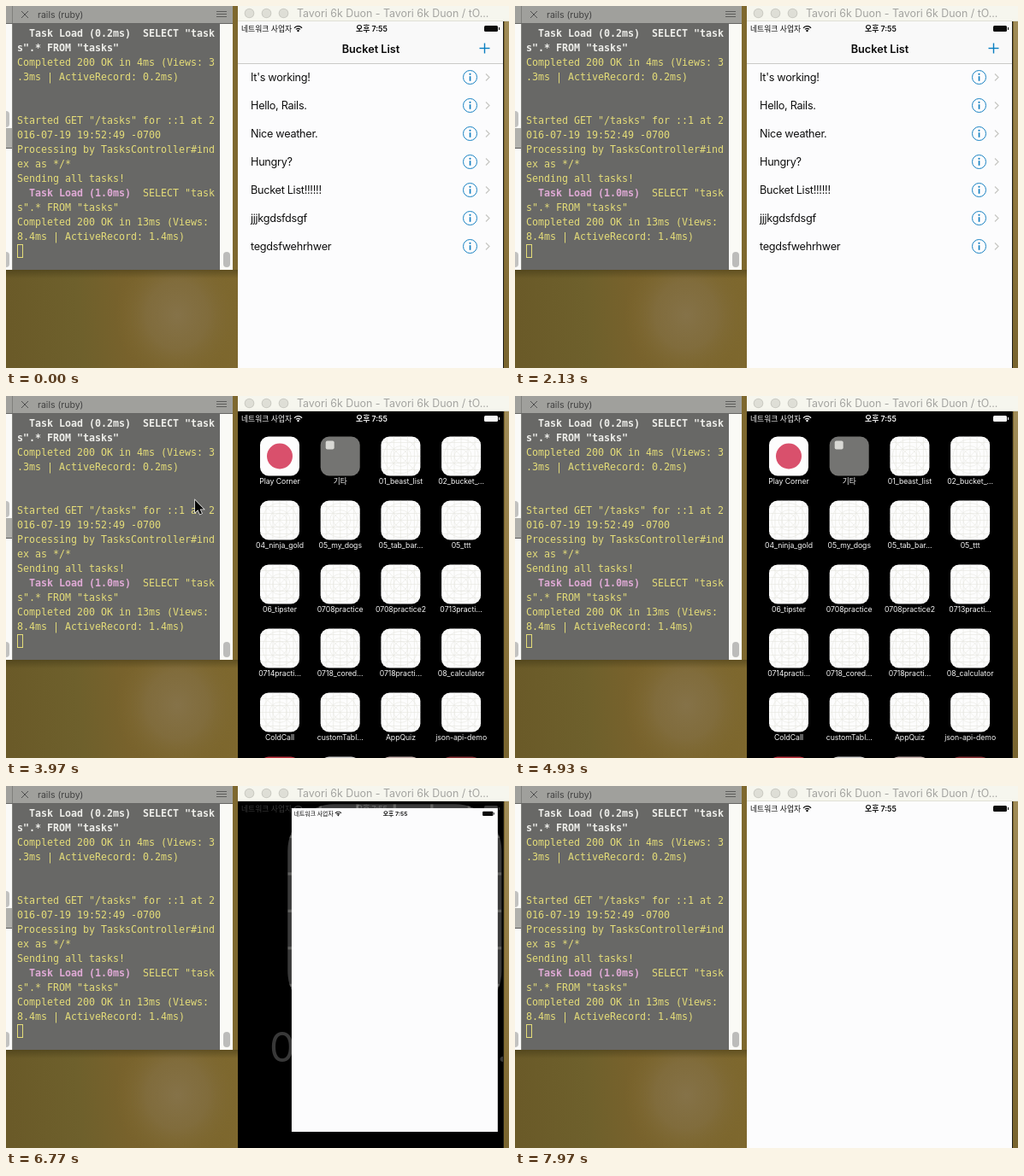
Animation of 588x424 px, one loop 8000 ms. Source, as an HTML page with a canvas:

```html
<!DOCTYPE html>
<html lang="ko">
<head>
<meta charset="utf-8">
<title>Tasks demo</title>
<style>
html, body { margin: 0; width: 100%; height: 100%; overflow: hidden; background: #70602c; }
canvas { display: block; }
</style>
</head>
<body>
<canvas id="stage" width="588" height="424"></canvas>
<script>
const ctx = document.getElementById('stage').getContext('2d');
const LOOP = 8000;
const SANS = 'Inter, "Noto Sans CJK KR", "Noto Sans CJK", sans-serif';
const MONO = '"DejaVu Sans Mono", monospace';
const SCREEN = { x: 271, y: 18, w: 311, h: 551 };
const ICON = 46;
const columnX = c => 320 + c * 70.7;
const rowY = r => 70.5 + r * 75;
const LAUNCH = { x: columnX(3), y: rowY(0) };

const tasks = ["It's working!", 'Hello, Rails.', 'Nice weather.', 'Hungry?',
  'Bucket List!!!!!!', 'jjjkgdsfdsgf', 'tegdsfwehrhwer'];
const apps = ['Play Corner', '기타', '01_beast_list', '02_bucket_…',
  '04_ninja_gold', '05_my_dogs', '05_tab_bar…', '05_ttt',
  '06_tipster', '0708practice', '0708practice2', '0713practi…',
  '0714practi…', '0718_cored…', '0718practi…', '08_calculator',
  'ColdCall', 'customTabl…', 'AppQuiz', 'json-api-demo'];
const LOG_COLOR = '#e4dc78';
const log = [
  [0, '  Task Load (0.2ms)  SELECT "task', '#eeeeea', 'bold'],
  [1, 's".* FROM "tasks"', '#eeeeea', 'bold'],
  [2, 'Completed 200 OK in 4ms (Views: 3'],
  [3, '.3ms | ActiveRecord: 0.2ms)'],
  [6, 'Started GET "/tasks" for ::1 at 2'],
  [7, '016-07-19 19:52:49 -0700'],
  [8, 'Processing by TasksController#ind'],
  [9, 'ex as */*'],
  [10, 'Sending all tasks!'],
  [11, '  Task Load (1.0ms)', '#e0aad6', 'bold'],
  [11, '                     SELECT "task'],
  [12, 's".* FROM "tasks"'],
  [13, 'Completed 200 OK in 13ms (Views:'],
  [14, '8.4ms | ActiveRecord: 1.4ms)']
];
// Pointer path: time, x, y; it is hidden between the two groups
const pointerPaths = [
  [[800, 232, 201], [980, 210, 221], [1250, 210, 221], [1500, 236, 206]],
  [[3450, 240, 151], [3700, 221, 122], [4230, 221, 122], [4500, 245, 151]]
];

const clamp = v => Math.max(0, Math.min(1, v));
const mix = (a, b, k) => a + (b - a) * k;
const easeOut = u => 1 - (1 - u) * (1 - u);

function rect(x, y, w, h, fill) {
  ctx.fillStyle = fill;
  ctx.fillRect(x, y, w, h);
}
function rounded(x, y, w, h, r, fill) {
  ctx.fillStyle = fill;
  ctx.beginPath();
  ctx.roundRect(x, y, w, h, r);
  ctx.fill();
}
function text(str, x, y, font, fill, align = 'left', spacing = 0) {
  ctx.font = font;
  ctx.fillStyle = fill;
  ctx.textAlign = align;
  ctx.letterSpacing = spacing + 'px';
  ctx.fillText(str, x, y);
  ctx.letterSpacing = '0px';
}
function disc(x, y, r, fill) {
  ctx.fillStyle = fill;
  ctx.beginPath();
  ctx.arc(x, y, r, 0, 7);
  ctx.fill();
}
function line(points, stroke, width = 1) {
  ctx.strokeStyle = stroke;
  ctx.lineWidth = width;
  ctx.beginPath();
  points.forEach(p => ctx.lineTo(p[0], p[1]));
  ctx.stroke();
}
function gradient(g, stops) {
  stops.forEach(([at, color]) => g.addColorStop(at, color));
  return g;
}

function wallpaper() {
  rect(0, 0, 588, 424, gradient(ctx.createLinearGradient(0, 330, 271, 309), [
    [0, '#6a5a28'], [.3, '#6e602c'], [.5, '#78622c'], [1, '#7e682e']]));
  ctx.save();
  ctx.translate(200, 362);
  ctx.scale(1, 1.1);
  disc(0, 0, 72, gradient(ctx.createRadialGradient(0, 0, 0, 0, 0, 72), [
    [0, '#857248'], [.5, 'rgba(130,110,64,.8)'], [1, 'rgba(126,104,46,0)']]));
  ctx.restore();
  rect(0, 309, 271, 10, gradient(ctx.createLinearGradient(0, 309, 0, 319), [
    [0, 'rgba(40,35,10,.35)'], [1, 'rgba(40,35,10,0)']]));
  rect(583, 18, 5, 406, gradient(ctx.createLinearGradient(0, 18, 0, 424), [
    [0, '#a08c58'], [.5, '#907840'], [1, '#78642e']]));
}

function terminal() {
  rect(0, 0, 265, 309, '#fafaf8');
  rect(0, 0, 265, 21, '#a0a09c');
  rect(7, 0, 1, 309, '#80807c');
  rect(0, 20, 265, 1, '#666664');
  line([[18, 6], [26, 14]], '#505050');
  line([[26, 6], [18, 14]], '#505050');
  text('rails (ruby)', 37, 14, '10.5px ' + SANS, '#404040');
  for (let y = 6; y < 15; y += 3) rect(246, y, 12, 1, '#5c5c5a');
  rect(0, 143, 7, 24, '#b0b0ac');
  rect(0, 166, 7, 1, '#5a5a58');
  rounded(-4, 123, 8, 19, 4, '#c2c2c0');
  rounded(-4, 288, 8, 18, 4, '#c2c2c0');
  rect(8, 21, 242, 288, '#686866');
  rect(250, 21, 15, 288, '#fafaf6');
  rounded(254, 288, 8, 18, 4, '#bcbcba');
  for (const [row, str, color = LOG_COLOR, weight = ''] of log)
    text(str, 13, 36 + row * 17, weight + ' 11.63px ' + MONO, color);
  ctx.strokeStyle = LOG_COLOR;
  ctx.lineWidth = 1;
  ctx.strokeRect(13.5, 279.5, 6, 15);
}

function titleBar() {
  rect(271, 0, 317, 18, '#f6f6ee');
  rect(271, 17, 317, 1, '#e0e0d6');
  for (const x of [284.5, 304.5, 324.5]) {
    disc(x, 8.5, 5.8, '#cacac2');
    disc(x, 8.5, 4.8, '#dedeD6');
  }
  text('Tavori 6k Duon - Tavori 6k Duon / tO...', 340, 13, '12.4px ' + SANS, '#a4a4a0');
}

function statusBar(color) {
  text('네트워크 사업자', 275, 30, '8.8px ' + SANS, color);
  ctx.strokeStyle = color;
  ctx.lineWidth = 1.3;
  for (const r of [3.2, 5.8]) {
    ctx.beginPath();
    ctx.arc(341.5, 29.5, r, -Math.PI * .78, -Math.PI * .22);
    ctx.stroke();
  }
  disc(341.5, 29, 1.2, color);
  text('오후 7:55', 427.5, 30, '600 8.8px ' + SANS, color, 'center');
  rounded(559, 23, 16, 7, 1.5, color);
  rect(576, 25, 1, 3, color);
}

function taskList() {
  rect(271, 18, 311, 49, '#f9f9f9');
  rect(271, 67, 311, 1, '#cacac8');
  text('Bucket List', 426.5, 55, '600 12.7px ' + SANS, '#080808', 'center');
  line([[553.5, 49.5], [565.5, 49.5]], '#087ec0', 1.4);
  line([[559.5, 43.5], [559.5, 55.5]], '#087ec0', 1.4);
  tasks.forEach((name, i) => {
    const y = 83.5 + i * 33;
    text(name, 286, y + 4.5, '12.7px ' + SANS, '#101010', 'left', -.3);
    ctx.strokeStyle = '#1681c2';
    ctx.lineWidth = 1;
    ctx.beginPath();
    ctx.arc(542.5, y, 8, 0, 7);
    ctx.stroke();
    disc(542.5, y - 3.7, 1.1, '#1681c2');
    rect(541.7, y - 1.3, 1.7, 5.6, '#1681c2');
    line([[561, y - 4], [565, y], [561, y + 4]], '#c8c8c4', 1.3);
  });
}

function appScreen(hasList) {
  rect(SCREEN.x, SCREEN.y, SCREEN.w, SCREEN.h, '#fcfcfd');
  if (hasList) taskList();
  statusBar('#0a0a0a');
}

function blankIcon(x, y) {
  rounded(x - 23, y - 23, ICON, ICON, 10, '#fdfdfd');
  ctx.save();
  ctx.clip();
  const color = '#e6e6e0';
  for (const d of [-16, -8, 0, 8, 16]) {
    line([[x + d, y - 23], [x + d, y + 23]], color, .6);
    line([[x - 23, y + d], [x + 23, y + d]], color, .6);
  }
  line([[x - 23, y - 23], [x + 23, y + 23]], color, .6);
  line([[x + 23, y - 23], [x - 23, y + 23]], color, .6);
  for (const r of [8, 12, 20]) {
    ctx.beginPath();
    ctx.arc(x, y, r, 0, 7);
    ctx.stroke();
  }
  ctx.restore();
}

function homeIcons() {
  apps.forEach((name, i) => {
    const x = columnX(i % 4), y = rowY(Math.floor(i / 4));
    if (i === 0) {
      rounded(x - 23, y - 23, ICON, ICON, 10, '#fdfdfd');
      disc(x, y, 15, '#d9506c');
    } else if (i === 1) {
      rounded(x - 23, y - 23, ICON, ICON, 10, '#747472');
      rounded(x - 17, y - 18, 10, 10, 2, '#d8d8d4');
    } else blankIcon(x, y);
    text(name, x, y + 32.5, '8.7px ' + SANS, '#f6f6f6', 'center', -.05);
  });
  ['#c03540', '#d8d7d5', '#cfb9b5', '#8d3438'].forEach((color, c) =>
    rounded(columnX(c) - 23, rowY(5) - 23, ICON, ICON, 10, color));
}

// k runs from 0 (home screen) to 1 (app fills the screen)
function phone(k, hasList) {
  ctx.save();
  ctx.beginPath();
  ctx.rect(SCREEN.x, SCREEN.y, SCREEN.w, 406);
  ctx.clip();
  if (k >= 1) appScreen(hasList);
  else {
    const half = ICON / 2;
    const left = mix(LAUNCH.x - half, SCREEN.x, k);
    const top = mix(LAUNCH.y - half, SCREEN.y, k);
    const width = mix(ICON, SCREEN.w, k);
    const height = mix(ICON, SCREEN.h, Math.pow(k, 1.36));
    const zoom = width / ICON * (1 + .05 * k);
    rect(SCREEN.x, SCREEN.y, SCREEN.w, 406, '#000');
    ctx.globalAlpha = clamp(1 - 1.05 * k);
    ctx.save();
    ctx.translate(left + width / 2, top + width / 2);
    ctx.scale(zoom, zoom);
    ctx.translate(-LAUNCH.x, -LAUNCH.y);
    homeIcons();
    ctx.restore();
    statusBar('#f8f8f8');
    if (k > 0) {
      ctx.globalAlpha = clamp(k * 4);
      ctx.beginPath();
      ctx.roundRect(left, top, width, height, 10 * clamp(1 - k * 1.5));
      ctx.clip();
      ctx.translate(left, top);
      ctx.scale(width / SCREEN.w, width / SCREEN.w);
      ctx.translate(-SCREEN.x, -SCREEN.y);
      appScreen(hasList);
    }
  }
  ctx.restore();
  rect(581, 18, 1, 406, '#1c1b16');
}

function pointer(t) {
  for (const path of pointerPaths) {
    const next = path.findIndex(p => p[0] > t);
    if (next < 1) continue;
    const a = path[next - 1], b = path[next];
    const u = (t - a[0]) / (b[0] - a[0]), k = u * u * (3 - 2 * u);
    ctx.save();
    ctx.translate(mix(a[1], b[1], k), mix(a[2], b[2], k));
    ctx.scale(.95, .95);
    ctx.beginPath();
    [[0, 0], [0, 15], [3.5, 11.8], [6, 17.3], [8.4, 16.2], [6, 11], [10.7, 11]]
      .forEach(p => ctx.lineTo(p[0], p[1]));
    ctx.closePath();
    ctx.lineWidth = 1.5;
    ctx.strokeStyle = '#f2f2f0';
    ctx.fillStyle = '#050505';
    ctx.stroke();
    ctx.fill();
    ctx.restore();
  }
}

function draw(t) {
  const closing = t < 4000;
  const k = closing ? 1 - easeOut(clamp((t - 2160) / 330)) : easeOut(clamp((t - 6530) / 495));
  wallpaper();
  terminal();
  titleBar();
  phone(k, closing);
  pointer(t);
}

function tick() {
  draw(performance.now() % LOOP);
  requestAnimationFrame(tick);
}
tick();
</script>
</body>
</html>
```
